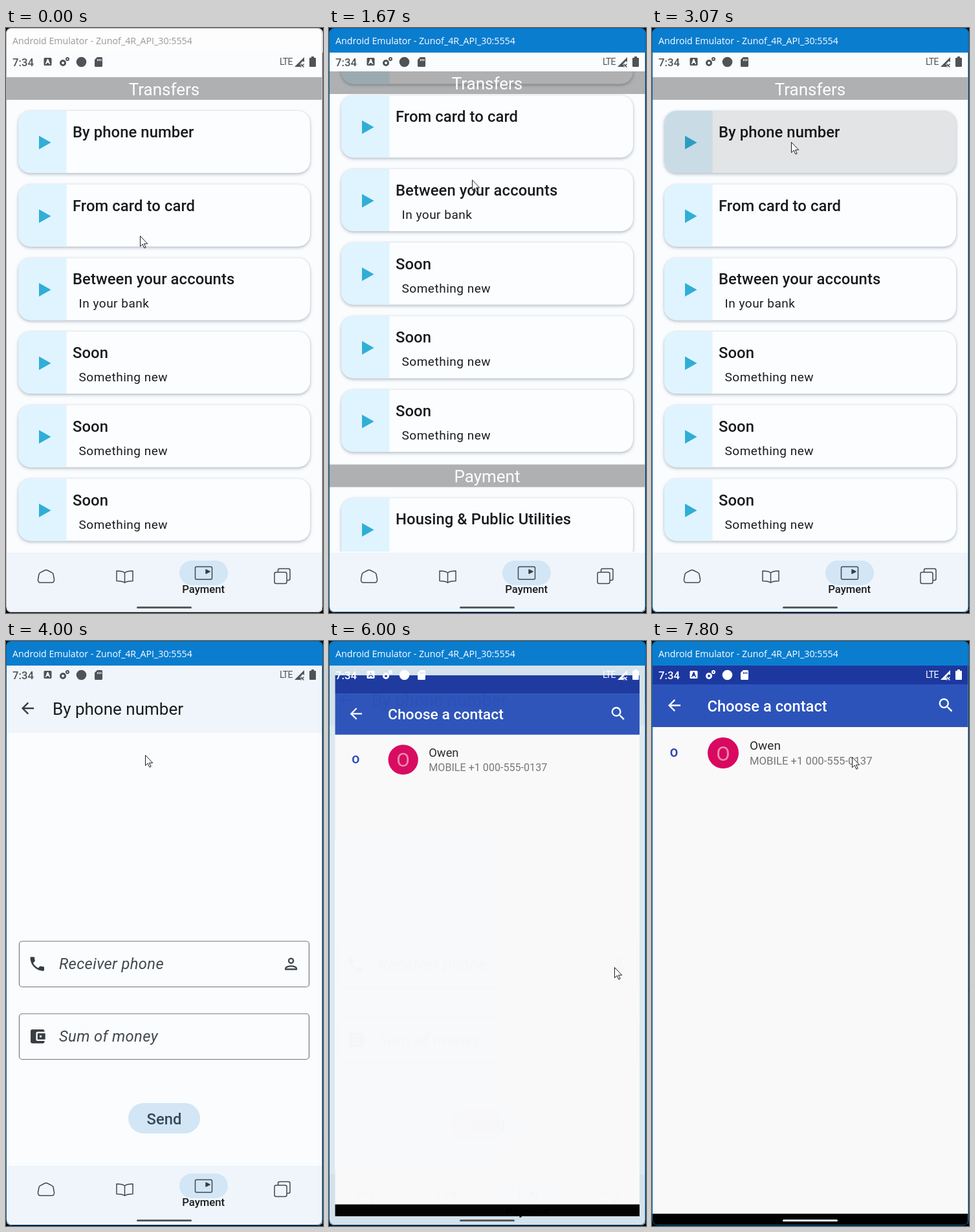
Write an HTML page that moves like this. It is 490 px wide and 904 px high and loops after 8000 ms.

```html
<!DOCTYPE html>
<html lang="en">
<head>
<meta charset="utf-8">
<title>Transfers</title>
<style>
@property --scroll { syntax: "<length>"; inherits: true; initial-value: 0px; }

html, body { margin: 0; width: 100%; height: 100%; overflow: hidden; background: #000; }
svg { display: block; width: 100%; height: 100%; }
text { font-family: Roboto, sans-serif; fill: #191c1e; white-space: pre; }
.medium { font-weight: 500; }
.middle { text-anchor: middle; }
.line { fill: none; stroke: #41484d; stroke-width: 1.5; stroke-linejoin: round; }
.page { fill: #fafcfe; }
.bar { fill: #eff5fa; }
.chip { fill: #d3e6f5; }

.title { font: 14.2px "Open Sans", "Noto Sans", sans-serif; }
.cardface { fill: #fcfdfe; filter: drop-shadow(0 0 1px #b9c6d280) drop-shadow(0 2px 2px #7c879480); }
.name { font-size: 23.8px; letter-spacing: .08px; }
.sub { font-size: 19.05px; letter-spacing: .5px; }
.band text { font-size: 26px; fill: #fff; }
.field rect { fill: none; stroke: #72787e; stroke-width: 1.2; }
.field text { font-size: 23.8px; font-style: italic; letter-spacing: .35px; fill: #41484d; }
.icon { fill: #363c41; }

#titlebar, #titletext, #edge, #list, #glow, #press, #form,
#tap, #app, #tint, #picker, #status, #pill, #cursor {
  animation: 8s linear infinite;
}
#titlebar { animation-name: titlebar; }
#titletext { animation-name: titletext; }
#edge { animation-name: edge; fill: none; }
#list { animation-name: scroll; }
#content { transform: translateY(calc(var(--scroll) * -1)); }
#sticky { transform: translateY(max(-9px, calc(var(--scroll) * -1))); }
#glow { animation-name: glow; fill: #4c565c; opacity: 0; }
#press { animation-name: press; opacity: 0; }
#form { animation-name: form; }
#tap { animation-name: tap; opacity: 0; }
#app { animation-name: recede; transform-origin: 244.5px 471px; }
#tint { animation-name: tint; fill: #e1ecf1; mix-blend-mode: multiply; }
#picker { animation-name: picker; transform-origin: 244.5px 471px; }
#status { animation-name: status; }
#status text { fill: inherit; }
#pill { animation-name: pill; }
#cursor { animation-name: cursor; }

@keyframes titlebar { 0%, .874% { fill: #fdfdfd; } .875%, 100% { fill: #0a7dcf; } }
@keyframes titletext { 0%, .874% { fill: #999; } .875%, 100% { fill: #fff; } }
@keyframes edge { 0%, .874% { stroke: #b4b7b9; } .875%, 100% { stroke: #0a67a4; } }
@keyframes scroll {
  0%, 12.9% { --scroll: 0px; }
  14.125% { --scroll: 45px; }
  15% { --scroll: 115px; }
  16.6% { --scroll: 192px; }
  17.9% { --scroll: 210px; }
  19.1% { --scroll: 195px; }
  20.875% { --scroll: 138px; }
  24.4%, 100% { --scroll: 0px; }
}
@keyframes glow { 0%, 24.4% { opacity: 0; } 25%, 26.5% { opacity: .1; } 29.5%, 100% { opacity: 0; } }
@keyframes press { 0%, 37.49% { opacity: 0; } 37.5% { opacity: .05; } 38.375%, 44% { opacity: .1; } 45%, 100% { opacity: 0; } }
@keyframes form { 0%, 43.37% { opacity: 0; } 43.375% { opacity: .8; } 45%, 100% { opacity: 1; } }
@keyframes tap { 0%, 69% { opacity: 0; } 70%, 74% { opacity: .1; } 75%, 100% { opacity: 0; } }
@keyframes recede {
  0%, 74.12% { transform: scale(1); }
  75% { transform: scale(1.037); }
  79%, 100% { transform: scale(1.1); }
}
@keyframes tint { 0%, 74.12% { opacity: 0; } 74.125%, 100% { opacity: 1; } }
@keyframes picker {
  0%, 74.12% { opacity: 0; transform: scale(.9); }
  74.125% { opacity: .5; transform: scale(.91); }
  75% { opacity: .985; transform: scale(.965); }
  76% { opacity: 1; transform: scale(.986); }
  77.5% { transform: scale(.996); }
  79%, 100% { opacity: 1; transform: scale(1); }
}
@keyframes status { 0%, 74.12% { fill: #505355; } 74.125%, 100% { fill: #fff; } }
@keyframes pill { 0%, 78.9% { fill: #585b5d; } 79%, 100% { fill: #fff; } }
@keyframes cursor {
  0%, 9.125% { transform: translate(207px, 321px); }
  11.25% { transform: translate(210px, 366px); }
  12.5% { transform: translate(214px, 340px); }
  14.125% { transform: translate(219px, 210px); }
  15.25% { transform: translate(222px, 155px); }
  17.1% { transform: translate(224px, 133px); }
  18.75% { transform: translate(223px, 157px); }
  20.875% { transform: translate(221px, 234px); }
  25%, 26.5% { transform: translate(216px, 362px); }
  30.5% { transform: translate(217px, 186px); }
  32.5% { transform: translate(215px, 176px); }
  50.5% { transform: translate(215px, 176px); animation-timing-function: ease-in-out; }
  60%, 62.5% { transform: translate(434px, 496px); }
  70% { transform: translate(441px, 504px); }
  79% { transform: translate(441px, 504px); animation-timing-function: ease-in-out; }
  95% { transform: translate(314px, 186px); }
  97.5%, 100% { transform: translate(309px, 179px); }
}
</style>
</head>
<body>
<svg viewBox="0 0 490 904">
  <defs>
    <clipPath id="window"><rect width="490" height="903" rx="8"/></clipPath>
    <clipPath id="screen"><rect x="1" y="38" width="487.5" height="866"/></clipPath>
    <clipPath id="viewport"><rect x="1" y="67" width="487.5" height="742"/></clipPath>
    <path id="back" d="M20 11H7.83l5.59-5.59L12 4l-8 8 8 8 1.41-1.41L7.83 13H20z"/>
  </defs>
  <g clip-path="url(#window)">
    <g clip-path="url(#screen)">
      <g id="app">
        <rect class="page" y="38" width="490" height="866"/>
        <g id="list" clip-path="url(#viewport)">
          <g id="content"></g>
          <g id="sticky"></g>
          <ellipse id="glow" cx="245" cy="67" rx="258" ry="51"/>
        </g>

        <g id="form">
          <rect class="page" y="38" width="490" height="775"/>
          <rect class="bar" y="38" width="490" height="104"/>
          <use href="#back" class="icon" transform="translate(19.2 89.7) scale(1.19)"/>
          <text x="72" y="114" font-size="26">By phone number</text>
          <g class="field">
            <rect x="20.5" y="464" width="448" height="70.5" rx="4.5"/>
            <text x="82" y="507">Receiver phone</text>
            <rect x="20.5" y="576" width="448" height="70.5" rx="4.5"/>
            <text x="82" y="619">Sum of money</text>
          </g>
          <path class="icon" transform="translate(34 484.7) scale(1.19)" d="M6.62 10.79c1.44 2.83 3.76 5.14 6.59 6.59l2.2-2.2c.27-.27.67-.36 1.02-.24 1.12.37 2.33.57 3.57.57.55 0 1 .45 1 1V20c0 .55-.45 1-1 1-9.39 0-17-7.61-17-17 0-.55.45-1 1-1h3.5c.55 0 1 .45 1 1 0 1.25.2 2.45.57 3.57.11.35.03.74-.25 1.02z"/>
          <g class="line" transform="translate(426.3 484.7) scale(1.19)" style="stroke-width:2;stroke-linejoin:miter">
            <circle cx="12" cy="8" r="3"/>
            <path d="M5 19v-1c0-2 4-3.1 7-3.1s7 1.1 7 3.1v1z"/>
          </g>
          <path class="icon" transform="translate(34.5 596.7) scale(1.19)" d="M21 18v1c0 1.1-.9 2-2 2H5c-1.1 0-2-.9-2-2V5c0-1.1.9-2 2-2h14c1.1 0 2 .9 2 2v1h-9c-1.1 0-2 .9-2 2v8c0 1.1.9 2 2 2zm-9-2h10V8H12zm4-2.5a1.5 1.5 0 1 1 0-3 1.5 1.5 0 0 1 0 3z"/>
          <circle id="tap" cx="440.5" cy="499" r="24"/>
          <rect class="chip" x="189" y="714" width="111" height="47" rx="23.5"/>
          <text class="medium middle" x="244.5" y="746.5" font-size="23.8" style="fill:#384956">Send</text>
        </g>

        <rect class="bar" y="811" width="490" height="93"/>
        <rect class="chip" x="268" y="823" width="75" height="38" rx="19"/>
        <g class="line">
          <path d="M51 844q.4-1.5 2-2.4l7-3.6q2-1 4 0l7 3.6q1.6.9 2 2.4l1.5 8q.5 5-4 5h-17q-4.500 0-4-5z"/>
          <path d="M183.500 842q-3-3-12.500-3v15.500q9.500 0 12.500 2.800 3-2.800 12.500-2.800V839q-9.500 0-12.500 3v15"/>
          <rect x="292.500" y="832.500" width="26" height="19.500" rx="2"/>
          <path d="M309 837l6 3-6 3z" fill="#2a3035"/>
          <path d="M420.500 841v-3q0-2.500 2.500-2.500h13.500q2.500 0 2.500 2.500v13q0 2.500-2.500 2.500h-2.500"/>
          <rect x="415" y="841" width="19" height="17.500" rx="2.500"/>
        </g>
        <text class="medium middle" x="305.2" y="873" font-size="16.7">Payment</text>
      </g>
      <rect id="tint" y="38" width="490" height="866"/>

      <g id="picker">
        <rect x="1" y="38" width="487.5" height="866" fill="#f9f9fa"/>
        <rect x="1" y="38" width="487.5" height="29" fill="#1c389f"/>
        <rect x="1" y="67" width="487.5" height="66" fill="#2c53ba"/>
        <rect x="1" y="885" width="487.5" height="19"/>
        <g fill="#fff">
          <use href="#back" transform="translate(20.2 85.2) scale(1.19)"/>
          <path transform="translate(440 85) scale(1.19)" d="M15.5 14h-.79l-.28-.27A6.47 6.47 0 0 0 16 9.5 6.5 6.5 0 1 0 9.5 16c1.61 0 3.09-.59 4.23-1.57l.27.28v.79l5 4.99L20.49 19zm-6 0a4.5 4.5 0 1 1 0-9 4.5 4.5 0 0 1 0 9z"/>
        </g>
        <text class="medium" x="85.5" y="108.5" font-size="23.7" style="fill:#fff">Choose a contact</text>
        <text class="middle" x="34" y="179" font-size="18" font-weight="700" style="fill:#2a48b4">O</text>
        <circle cx="110" cy="173" r="24" fill="#d8095f"/>
        <text class="middle" x="110" y="184.500" font-size="31" style="fill:#ee8db2">O</text>
        <text x="151" y="168" font-size="19" style="fill:#2a2a2c">Owen</text>
        <text x="151" y="191" font-size="16.7" style="fill:#767677">MOBILE +1 000-555-0137</text>
      </g>

      <g id="status">
        <text class="medium" x="10" y="59" font-size="16.7">7:34</text>
        <path fill-rule="evenodd" d="M60 46h9q1.5 0 1.5 1.5v9q0 1.5-1.5 1.5h-9q-1.5 0-1.5-1.5v-9q0-1.5 1.5-1.5zM63.700 48l-3 8h1.600l.7-2h3l.7 2h1.600l-3-8z"/>
        <path fill-rule="evenodd" d="M83 54a5 5 0 1 0 10 0 5 5 0 1 0-10 0zm3 0a2 2 0 1 1 4 0 2 2 0 1 1-4 0zM92 48a3 3 0 1 0 6 0 3 3 0 1 0-6 0zm2 0a1 1 0 1 1 2 0 1 1 0 1 1-2 0z"/>
        <circle cx="116.5" cy="52.5" r="7.8"/>
        <path fill-rule="evenodd" d="M141 45h6.5q1.5 0 1.5 1.5v12q0 1.5-1.5 1.5h-9q-1.5 0-1.5-1.5V49zm0 3v3h1.3v-3zm2.5 0v3h1.3v-3zm2.500 0v3h1.300v-3z"/>
        <text x="423" y="57" font-size="14" letter-spacing="-.8">LTE</text>
        <path fill-rule="evenodd" d="M446 60l15-15v8l-2-2-5 5 4 4zm9-4l1-1 2 2 2-2 1 1-2 2 2 2-1 1-2-2-2 2-1-1 2-2z"/>
        <path d="M472 44h4v2h2q1 0 1 1v12q0 1-1 1h-8q-1 0-1-1V47q0-1 1-1h2z"/>
      </g>
      <rect id="pill" x="202" y="894" width="85" height="3" rx="1.5"/>
    </g>

    <rect id="titlebar" width="490" height="38"/>
    <text id="titletext" class="title" x="10" y="25">Android Emulator - Zunof_4R_API_30:5554</text>
    <rect id="edge" x=".5" y=".5" width="488.5" height="902" rx="8"/>
  </g>
  <path id="cursor" d="M.5.5v16l3.700-3.500 2.700 6 2.300-1-2.700-5.700h5.200z" fill="#fff" stroke="#1c1c1c"/>
</svg>
<script>
const cardPitch = 113.7;

const card = (y, name = "", sub = "", extra = "") => `
  <g transform="translate(0 ${y})">
    <rect class="cardface" x="19" width="451" height="96" rx="19"/>
    <path d="M93.5 0H38a19 19 0 0 0-19 19v58a19 19 0 0 0 19 19h55.5z" fill="#dff4fe"/>
    <path d="M51 38.5l18.5 10.5-18.5 10.5z" fill="#31aed6"/>
    <text class="name medium" x="103" y="41">${name}</text>
    <text class="sub" x="112.5" y="77">${sub}</text>
    ${extra}
  </g>`;

const band = (y, label) => `
  <g class="band" transform="translate(0 ${y})">
    <rect x="1" width="487.5" height="35" fill-opacity=".3"/>
    <text class="middle" x="244.5" y="27.5">${label}</text>
  </g>`;

const transfers = [
  ["By phone number", "", '<rect id="press" x="19" width="451" height="96" rx="19"/>'],
  ["From card to card"],
  ["Between your accounts", "In your bank"],
  ...Array(3).fill(["Soon", "Something new"]),
];
const payments = [["Housing &amp; Public Utilities"], []];

const cards = (top, items) => items.map((item, i) => card(top + i * cardPitch, ...item)).join("");

document.getElementById("content").innerHTML =
  cards(128, transfers) + band(812, "Payment") + cards(864, payments);
document.getElementById("sticky").innerHTML = band(76, "Transfers");
</script>
</body>
</html>
```
